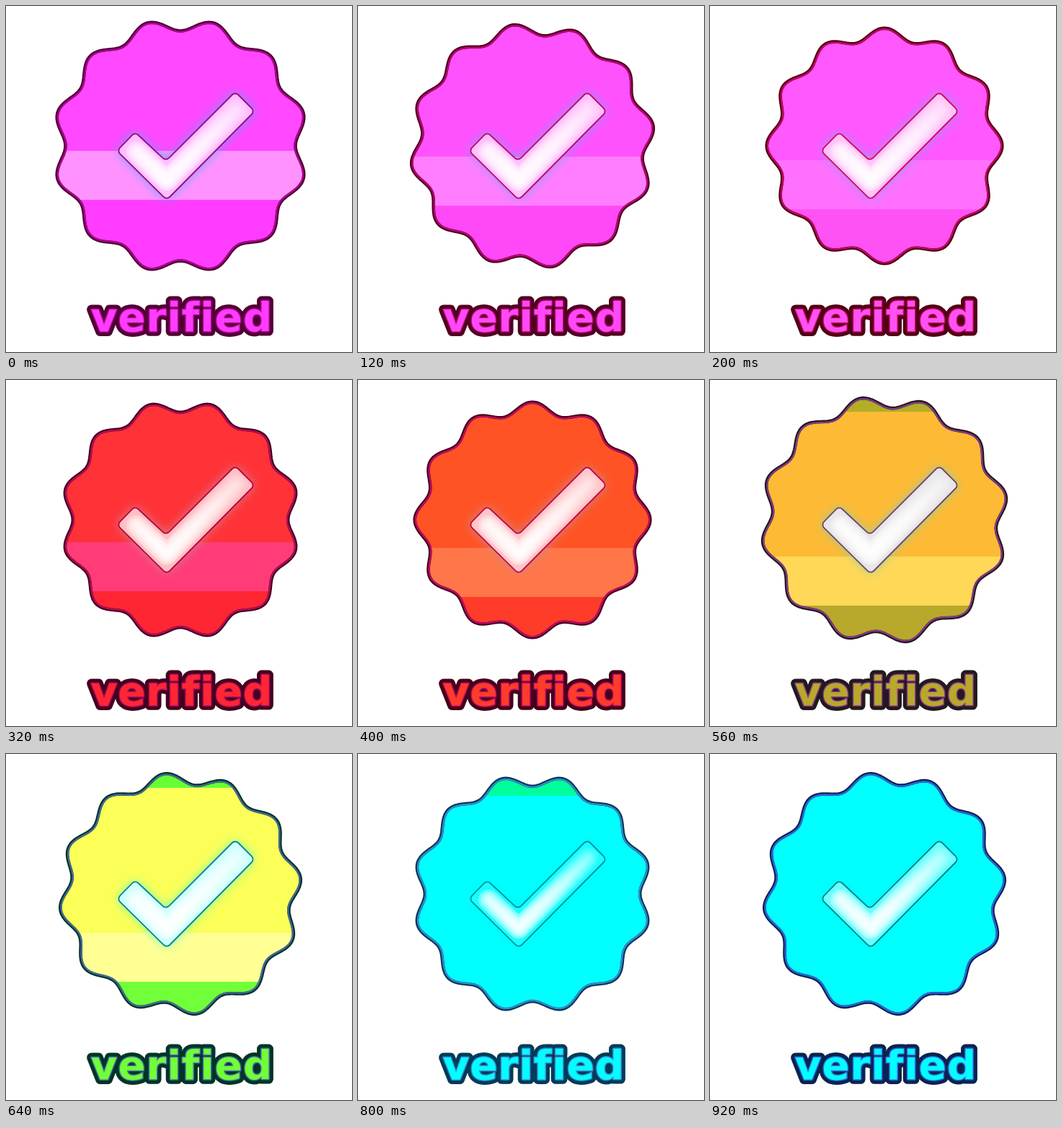
These frames come from a looping animation (480x480 px, 960 ms). An HTML page with a canvas:

```html
<!DOCTYPE html>
<html lang="en">
<head>
<meta charset="utf-8">
<style>
  html, body { margin: 0; width: 100%; height: 100%; overflow: hidden; background: #fff; }
  canvas { display: block; }
</style>
</head>
<body>
<canvas id="stage" width="480" height="480"></canvas>
<script>
const ctx = document.getElementById('stage').getContext('2d');
const LOOP = 960, STEP = 40, CX = 242, CY = 194;

// Palette and stripe position over the loop
const TIMES = [0, 200, 320, 480, 640, 800, 920, 960];
const LOOK = {
  fill:  ['#ff48ff', '#ff58ff', '#ff3238', '#ff7412', '#fbff58', '#00ffff', '#00ffff'],
  band:  ['#ff92ff', '#ff70ff', '#ff3c78', '#ffb01a', '#ffff94', '#00ffff', '#00ffff'],
  base:  ['#ff3cff', '#ff52f4', '#ff2634', '#ff5020', '#70ff38', '#00ffff', '#00ffff'],
  cap:   ['#ff48ff', '#ff58ff', '#ff3238', '#ff5a18', '#66ff34', '#00ff9c', '#00ffff'],
  rim:   ['#500034', '#500014', '#440020', '#440014', '#003428', '#003c58', '#0a2450'],
  edge:  ['#a8088c', '#c00860', '#b80c58', '#c80878', '#4868a0', '#3c88d0', '#3464dc'],
  tint:  ['#ffc0ff', '#ffc4fa', '#ffc0c4', '#ffccd0', '#d0ffff', '#18ffff', '#68ffff'],
  tick:  ['#a00080', '#dc0058', '#b80040', '#d80850', '#008494', '#00949c', '#00848c'],
  glow:  ['#58a8ff', '#88a0f8', '#c88890', '#b8988c', '#70ffc0', '#00f4f4', '#00f8f8']
};
const STRIPE = [201, 214, 225, 241, 248, 259, 268, 271];

// Badge sway: 0 is large, 1 is turned by one scallop
const SWAY_TIMES = [0, 160, 200, 320, 440, 480];
const SWAY = [0, .25, .5, 1, .25, 0];

const TICK = [[179, 175], [154, 201], [223, 269], [345, 146], [318, 119], [222, 215]];

function locate(times, t) {
  let i = 0;
  while (i < times.length - 2 && t >= times[i + 1]) i++;
  return [i, (t - times[i]) / (times[i + 1] - times[i])];
}

function tween(times, values, t) {
  const [i, f] = locate(times, t);
  return values[i] + (values[i + 1] - values[i]) * f;
}

function blend(colors, t) {
  const [i, f] = locate(TIMES, t);
  const channels = hex => [1, 3, 5].map(n => parseInt(hex.slice(n, n + 2), 16));
  const a = channels(colors[i]), b = channels(colors[(i + 1) % colors.length]);
  return `rgb(${a.map((v, n) => Math.round(v + (b[n] - v) * f))})`;
}

function badgePath(scale, turn) {
  const path = new Path2D();
  for (let deg = 0; deg < 360; deg++) {
    const a = deg * Math.PI / 180;
    const r = scale * (168 + 8.5 * Math.cos(12 * (a - turn)));
    path.lineTo(CX + r * Math.sin(a), CY - r * Math.cos(a));
  }
  path.closePath();
  return path;
}

function roundedPath(points, radius) {
  const path = new Path2D(), n = points.length;
  const [p, q] = [points[n - 1], points[0]];
  path.moveTo((p[0] + q[0]) / 2, (p[1] + q[1]) / 2);
  points.forEach((c, i) => path.arcTo(...c, ...points[(i + 1) % n], radius));
  path.closePath();
  return path;
}

const tickPath = roundedPath(TICK, 6);
const tickCore = new Path2D('M181 202 L223 242 L320 144');

function stroke(path, color, width) {
  ctx.strokeStyle = color;
  ctx.lineWidth = width;
  ctx.stroke(path);
}

function stripe(color, top, bottom) {
  ctx.fillStyle = color;
  ctx.fillRect(0, top, 480, bottom - top);
}

function drawBadge(t, c) {
  const sway = tween(SWAY_TIMES, SWAY, t % 480);
  const scale = 1 - .235 * sway + .17 * sway * sway;
  const turn = (15 + 30 * sway) * Math.PI / 180;
  const outline = badgePath(scale, turn);
  const y = Math.round(tween(TIMES, STRIPE, t));

  ctx.save();
  ctx.clip(outline);
  stripe(c.fill, 0, y);
  stripe(c.cap, 0, y - 201);
  if (t > 400 && t < 560) stripe('#ff9420', y - 80, y - 67);
  stripe(c.band, y, y + 68);
  if (t > 400 && t < 560) stripe('#ffd414', y + 52, y + 68);
  stripe(c.base, y + 68, 480);
  ctx.restore();

  stroke(outline, c.rim, 4.6);
  stroke(badgePath(scale * .993, turn), c.edge, 2.2);
}

function drawTick(c) {
  ctx.save();
  ctx.shadowColor = c.glow;
  ctx.shadowBlur = 14;
  ctx.fillStyle = c.tint;
  ctx.fill(tickPath);
  ctx.restore();

  // Soft highlight along the middle, brightest at the bend
  const shine = ctx.createRadialGradient(223, 236, 4, 223, 236, 150);
  shade(shine, [.5, .1]);
  ctx.save();
  ctx.clip(tickPath);
  ctx.lineCap = 'round';
  for (const width of [28, 21, 14, 7]) stroke(tickCore, shine, width);
  ctx.restore();
  stroke(tickPath, c.tick, 1.8);
}

function shade(gradient, alphas) {
  alphas.forEach((alpha, i) => gradient.addColorStop(i, `rgba(255, 255, 255, ${alpha})`));
}

function drawLabel(c) {
  ctx.font = 'bold 56px "DejaVu Sans", sans-serif';
  ctx.letterSpacing = '1.2px';
  ctx.textAlign = 'center';
  for (const [color, width] of [[c.rim, 13], [c.edge, 3]]) {
    ctx.strokeStyle = color;
    ctx.lineWidth = width;
    ctx.strokeText('verified', 244, 451);
  }
  ctx.fillStyle = c.base;
  ctx.fillText('verified', 244, 451);
}

function draw(now) {
  const t = Math.floor(now % LOOP / STEP) * STEP;
  const c = {};
  for (const name in LOOK) c[name] = blend(LOOK[name], t);
  ctx.fillStyle = '#fff';
  ctx.fillRect(0, 0, 480, 480);
  ctx.lineJoin = 'round';
  drawBadge(t, c);
  drawTick(c);
  drawLabel(c);
}

let start;
function loop(now) {
  start ??= now;
  draw(now - start);
  requestAnimationFrame(loop);
}
draw(0);
requestAnimationFrame(loop);
</script>
</body>
</html>
```
